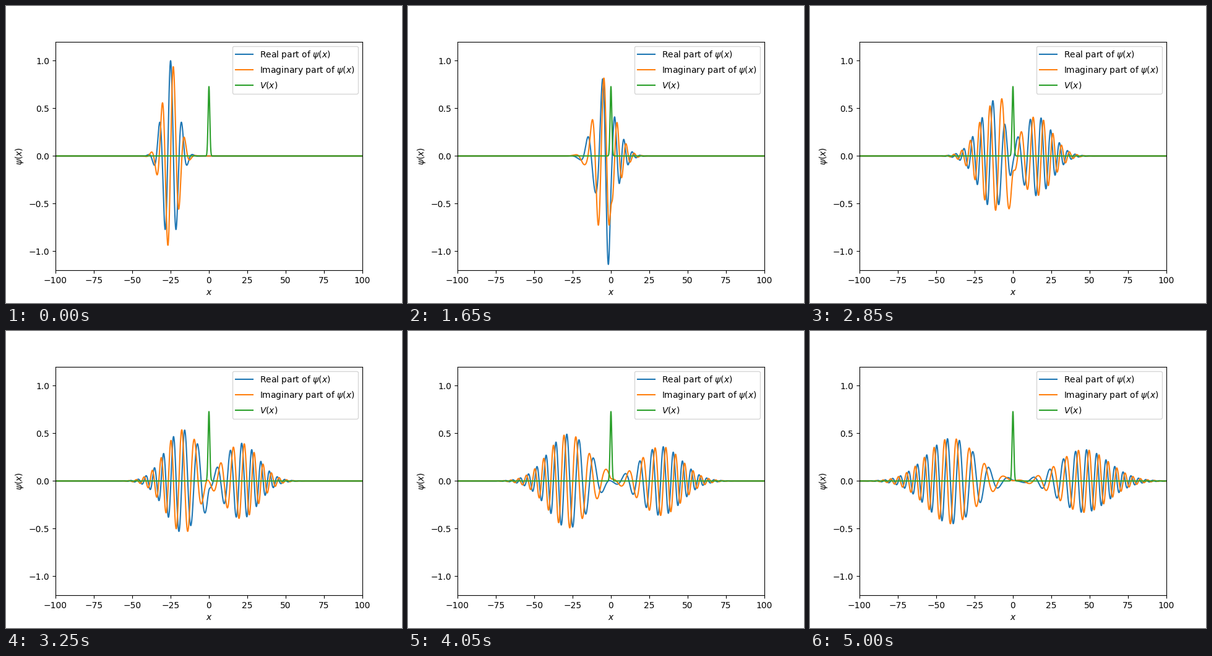
A matplotlib script that plays this animation: 640x480 px, repeating every 5050 ms.

```python
import numpy as np
import matplotlib.pyplot as plt
from matplotlib.animation import FuncAnimation

FRAMES = 101
INTERVAL = 50        # ms
DT = 0.8             # simulated time per frame
SUBSTEPS = 20

# Wave packet and barrier (hbar = m = 1)
X0, K0, SIGMA = -25.0, 0.85, 5.0
BARRIER_VAR = 0.3

# Periodic grid, wider than the view so nothing wraps around
N, DX = 4000, 0.1
x = (np.arange(N) - N // 2) * DX
k = 2 * np.pi * np.fft.fftfreq(N, DX)
V = np.exp(-x**2 / (2 * BARRIER_VAR)) / np.sqrt(2 * np.pi * BARRIER_VAR)


def evolve():
    """Split-step solution of the Schroedinger equation, one row per frame."""
    h = DT / SUBSTEPS
    half_kick = np.exp(-0.5j * h * V)
    drift = np.exp(-0.5j * h * k**2)
    psi = np.exp(-(x - X0)**2 / (2 * SIGMA**2) + 1j * K0 * (x - X0))
    rows = [psi]
    for _ in range(FRAMES - 1):
        for _ in range(SUBSTEPS):
            psi = half_kick * np.fft.ifft(drift * np.fft.fft(half_kick * psi))
        rows.append(psi)
    return np.array(rows)


view = np.abs(x) <= 100 + DX / 2
xs = x[view]
waves = evolve()[:, view]

fig, ax = plt.subplots(figsize=(6.4, 4.8), dpi=100)
real_line, = ax.plot(xs, waves[0].real, label=r"Real part of $\psi(x)$")
imag_line, = ax.plot(xs, waves[0].imag, label=r"Imaginary part of $\psi(x)$")
ax.plot(xs, V[view], label=r"$V(x)$")
ax.set_xlim(-100, 100)
ax.set_ylim(-1.2, 1.2)
ax.set_xlabel(r"$x$")
ax.set_ylabel(r"$\psi(x)$")
ax.legend(loc="upper right")


def draw(i):
    real_line.set_ydata(waves[i].real)
    imag_line.set_ydata(waves[i].imag)
    return real_line, imag_line


anim = FuncAnimation(fig, draw, frames=FRAMES, interval=INTERVAL,
                     init_func=lambda: draw(0), repeat=True, repeat_delay=0)
plt.show()
```
